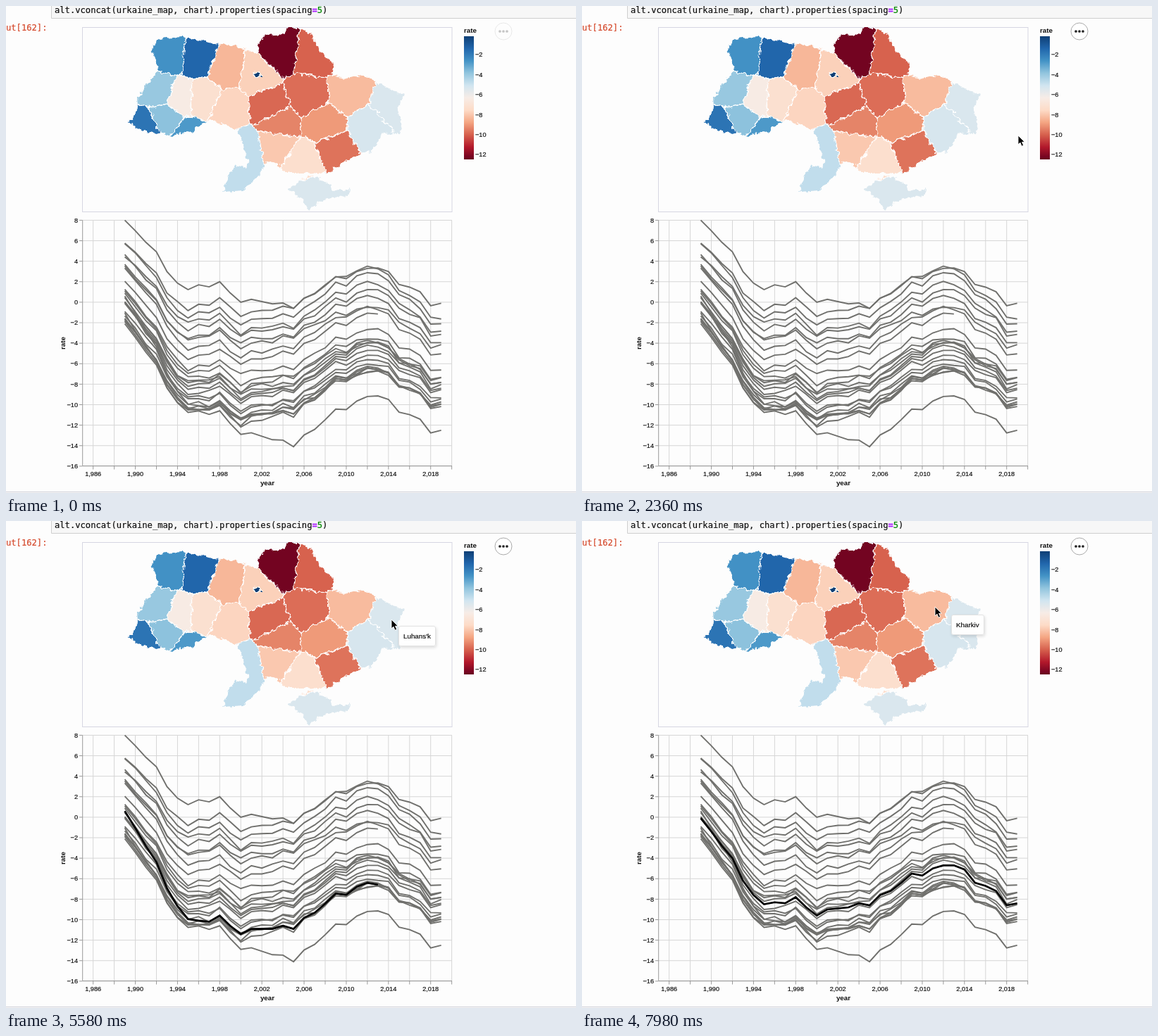
Animation, 809 px wide and 692 px high, one loop 8 s. Source, as an HTML page:

```html
<!DOCTYPE html>
<html lang="en">
<head>
<meta charset="utf-8">
<style>
html, body { margin: 0; width: 100%; height: 100%; overflow: hidden; background: #fdfdfd; }
svg { position: absolute; left: 0; top: 0; }
text { font: 9.2px "Liberation Sans", sans-serif; fill: #111; stroke: #111; stroke-width: .2; }
.title { font-size: 9.8px; font-weight: bold; stroke: none; }
.code { font: 12.15px "DejaVu Sans Mono", monospace; white-space: pre; }
.grid { stroke: #d6d6d6; }
.axis { stroke: #999; }
.series { fill: none; stroke: #70706d; stroke-width: 1.9; }
.active { stroke: #000; stroke-width: 2.7; }
#regions { stroke: #fff; stroke-width: 1.3; }
#tip {
  position: absolute; left: 0; top: 0; box-sizing: border-box; height: 29px; padding: 0 6px;
  border: 1px solid #e2e2e2; border-radius: 3px; background: #fffffff5; color: #111;
  box-shadow: 1px 2px 4px #0002; font: 9.8px/27px "Liberation Sans", sans-serif;
  -webkit-text-stroke: .2px #111;
}
</style>
</head>
<body>
<svg width="809" height="692" viewBox="0 0 809 692">
  <defs>
    <filter id="rough" color-interpolation-filters="sRGB">
      <feTurbulence type="fractalNoise" baseFrequency=".13" numOctaves="3" seed="4"/>
      <feDisplacementMap in="SourceGraphic" scale="9" xChannelSelector="R" yChannelSelector="G"/>
    </filter>
    <linearGradient id="scale" x2="0" y2="1"></linearGradient>
    <clipPath id="country">
      <path d="M207 56L222 46 250 44 293 53 316 55 337 61 357 66 360 51 368 42 393 40 401 31 418 31 434 42
        447 67 465 82 462 98 484 103 508 98 530 111 565 126 556 143 562 172 559 181 535 182 520 205 497 212
        475 224 455 238 425 237 395 237 384 224 371 219 362 236 338 262 308 264 317 240 326 226 342 230
        344 222 330 176 290 162 264 177 237 185 193 177 176 166 187 143 186 130 207 103 217 91 208 66Z
        M432 240L462 254 463 263 488 261 485 269 450 275 430 291 422 276 400 259Z"/>
    </clipPath>
  </defs>
  <path d="M64.5-2V17.5H812V-2Z" fill="#f7f7f7" stroke="#cfcfcf"/>
  <text class="code" x="69" y="10">alt.vconcat(urkaine_map, chart).properties(spacing<tspan fill="#a2f" stroke="#a2f" font-weight="bold">=</tspan><tspan fill="#080" stroke="#080">5</tspan>)</text>
  <text class="code" x="0" y="35" style="fill:#d5492c;stroke:#d5492c">ut[162]:</text>
  <path d="M0 690.5H809" stroke="#ccccd4"/>
  <rect x="108.5" y="30.5" width="524.5" height="262" fill="none" stroke="#d6d6e2"/>
  <g filter="url(#rough)"><g id="regions" clip-path="url(#country)"></g></g>
  <text class="title" x="650" y="38">rate</text>
  <rect x="650" y="43" width="14" height="175" fill="url(#scale)"/>
  <g id="legend"></g>
  <g id="menu">
    <circle cx="706" cy="36" r="12" fill="#fff" stroke="#aaa"/>
    <path d="M701 36h0m5 0h0m5 0h0" stroke="#222" stroke-width="3.7" stroke-linecap="round"/>
  </g>
  <g id="axes"></g>
  <g id="lines"></g>
  <text class="title" x="371" y="681" text-anchor="middle">year</text>
  <text class="title" transform="translate(84 479) rotate(-90)" text-anchor="middle">rate</text>
</svg>
<div id="tip"></div>
<svg width="809" height="692">
  <path id="cursor" d="M0 0V12.8L3 10.2 5 15.2 7.6 14.1 5.5 9.3H9.3Z" stroke="#fff" stroke-width=".9"/>
</svg>
<script>
const $ = id => document.getElementById(id);
const add = (parent, tag, attrs, text = '') => {
  const node = document.createElementNS('http://www.w3.org/2000/svg', tag);
  for (const name in attrs) node.setAttribute(name, attrs[name]);
  node.textContent = text;
  return $(parent).appendChild(node);
};
const xAt = year => 108.7 + (year - 1985) * 14.97;
const yAt = rate => 420.9 - rate * 14.56;
const label = value => String(value).replace('-', '−');
const mix = (a, b, p) => a.map((v, i) => v + (b[i] - v) * p);

// Interpolates rows of [key, ...values] at k, clamped at both ends.
const interpolate = (rows, k) => {
  const next = rows.findIndex(row => row[0] > k);
  if (next < 0) return rows.at(-1).slice(1);
  if (next === 0) return rows[0].slice(1);
  const a = rows[next - 1], b = rows[next];
  return mix(a, b, (k - a[0]) / (b[0] - a[0])).slice(1);
};

// Name, seat x and y, latest rate; a fifth value is the level of a line that stops in 2013.
const regions = [
  ['Volyn', 232, 70, -2.8], ['Rivne', 272, 75, -1.6], ['Zhytomyr', 313, 90, -8.6],
  ['Kyiv', 357, 97, -8], ['Chernihiv', 388, 66, -12.5], ['Sumy', 436, 72, -10.2],
  ['Lviv', 218, 120, -4.2], ['Ternopil', 248, 130, -6.6], ['Khmelnytskyi', 279, 130, -7.4],
  ['Vinnytsia', 316, 146, -7.9], ['Cherkasy', 374, 143, -10.1], ['Poltava', 428, 126, -10],
  ['Kharkiv', 486, 124, -8.5], ["Luhans'k", 548, 143, -5.6, -10], ['Donetsk', 516, 173, -5.5, -10.2],
  ['Zakarpattia', 200, 174, -2], ['Ivano-Frankivsk', 226, 162, -4], ['Chernivtsi', 258, 186, -3],
  ['Kirovohrad', 386, 167, -9.6], ['Dnipro', 452, 168, -9.2], ['Zaporizhzhia', 466, 205, -9.9],
  ['Kherson', 424, 222, -7.5], ['Mykolaiv', 382, 196, -8.2], ['Odesa', 341, 204, -5],
  ['Crimea', 440, 265, -5.6, -5.5],
].map(([name, x, y, rate, level]) => ({ name, seat: [x, y], rate, level }));
const capital = { name: 'Kyiv City', rate: -.1 };

// Colour scale
const palette = '0f3f75 2166ac 4393c6 92c5de d1e5f0 f7ece6 fddbc7 f4a582 d6604d b2182b 67001f'
  .split(' ').map((hex, i) => [i, ...hex.match(/../g).map(c => parseInt(c, 16))]);
const colorAt = i => `rgb(${interpolate(palette, i)})`;
const rateColor = rate => colorAt(-rate * .812 - .31);
palette.forEach((_, i) => add('scale', 'stop', { offset: i / 10, 'stop-color': colorAt(i) }));
for (let v = -2; v >= -12; v -= 2)
  add('legend', 'text', { x: 666, y: 44 - v * 14.2 }, label(v));

// Map: every region is the area nearest to its seat, cut to the country's outline.
const distance2 = (a, b) => (a[0] - b[0]) ** 2 + (a[1] - b[1]) ** 2;
const keepNearer = (polygon, seat, other) => {
  const margin = p => distance2(p, other) - distance2(p, seat);
  return polygon.flatMap((p, i) => {
    const q = polygon[(i + 1) % polygon.length], a = margin(p), b = margin(q);
    return [...(a >= 0 ? [p] : []), ...(a * b < 0 ? [mix(p, q, a / (a - b))] : [])];
  });
};
for (const region of regions) {
  let cell = [[109, 30], [633, 30], [633, 292], [109, 292]];
  for (const other of regions)
    if (other !== region) cell = keepNearer(cell, region.seat, other.seat);
  add('regions', 'polygon', { points: cell.join(' '), fill: rateColor(region.rate) });
}
add('regions', 'circle', { cx: 357, cy: 97, r: 5, fill: rateColor(capital.rate) });

// Axes
for (let v = -16; v <= 8; v += 2) {
  const y = yAt(v);
  add('axes', 'path', { class: 'grid', d: `M108.7 ${y}H633` });
  add('axes', 'path', { class: 'axis', d: `M104 ${y}h4.7` });
  add('axes', 'text', { x: 102, y: y + 3.2, 'text-anchor': 'end' }, label(v));
}
for (let year = 1986; year <= 2020; year += 2) {
  const x = xAt(year);
  add('axes', 'path', { class: 'grid', d: `M${x} 304.5V653.5` });
  add('axes', 'path', { class: 'axis', d: `M${x} 653.5v5` });
  if (year % 4 === 2)
    add('axes', 'text', { x, y: 668, 'text-anchor': 'middle' }, year.toLocaleString('en-US'));
}
add('axes', 'path', { class: 'axis', fill: 'none', d: 'M108.7 304.5V653.5H633' });

// Line chart: one common course, shifted by each region's level.
const course = ('-.1 -1.4 -2.8 -4 -6.2 -7.6 -8.5 -8.3 -8.4 -7.8 -8.8 -9.6 -9 -8.9 -8.8 -8.4 -8.6 -7.6 ' +
  '-7.2 -6.4 -5.5 -5.7 -5 -4.7 -4.7 -5.1 -6.4 -6.7 -7.2 -8.6 -8.4').split(' ').map(Number);
const turns = [0, 7, 11, 16, 23, 30];
const spread = [.9, 1.14, 1.2, 1.15, 1.14, 1];
const ownShifts = {
  Kharkiv: [0, 0, 0, 0, 0, 0],
  "Luhans'k": [.7, -1.8, -1.8, -2.3, -1.7, -3],
  Chernihiv: [-2, -2.3, -3.3, -5.5, -4.5, -4.1],
  'Kyiv City': [8.1, 10, 9.6, 8, 8, 8.3],
};
let seed = 7;
const jitter = size => ((seed = seed * 16807 % 2147483647) / 2147483647 - .5) * size;
const rates = ({ name, rate, level }) => {
  const own = ownShifts[name];
  const shifts = turns.map((turn, i) => [turn,
    own ? own[i] : spread[i] * ((level ?? rate) - course[30]) + jitter(i < 5 ? .9 : 0)]);
  return course.slice(0, level ? 25 : 31)
    .map((base, year) => base + interpolate(shifts, year)[0] + (own ? 0 : jitter(.35)));
};
const plot = (region, className = 'series') => add('lines', 'polyline', {
  class: className, points: rates(region).map((rate, i) => [xAt(1989 + i), yAt(rate)]).join(' '),
});
[capital, ...regions].forEach(region => plot(region));
const active = {};
for (const name of ["Luhans'k", 'Kharkiv'])
  active[name] = plot(regions.find(region => region.name === name), 'series active');

// Pointer: time, x, y
const pointer = [
  [1980, 800, 262], [2280, 619, 184], [2880, 619, 184], [3280, 561, 149],
  [3380, 547, 140], [7580, 547, 140], [7880, 514, 124], [7980, 501, 122],
];
const place = (node, x, y) => node.style.transform = `translate(${x}px, ${y}px)`;
const start = performance.now();

function draw() {
  const time = (performance.now() - start) % 8000;
  const step = Math.floor((time - 80) / 100) * 100 + 80;
  const entered = step >= 1980;
  $('menu').style.opacity = entered ? 1 : .25;
  $('cursor').style.visibility = entered ? 'visible' : 'hidden';
  place($('cursor'), ...interpolate(pointer, step));

  // The hover reaction trails the pointer by one step.
  const [x, y] = interpolate(pointer, step - 100);
  const hovered = x < 518 ? 'Kharkiv' : x < 565 ? "Luhans'k" : '';
  for (const name in active) active[name].style.display = name === hovered ? '' : 'none';
  $('tip').style.display = hovered ? '' : 'none';
  $('tip').textContent = hovered;
  place($('tip'), x + 10, y + 9);
  requestAnimationFrame(draw);
}
draw();
</script>
</body>
</html>
```
